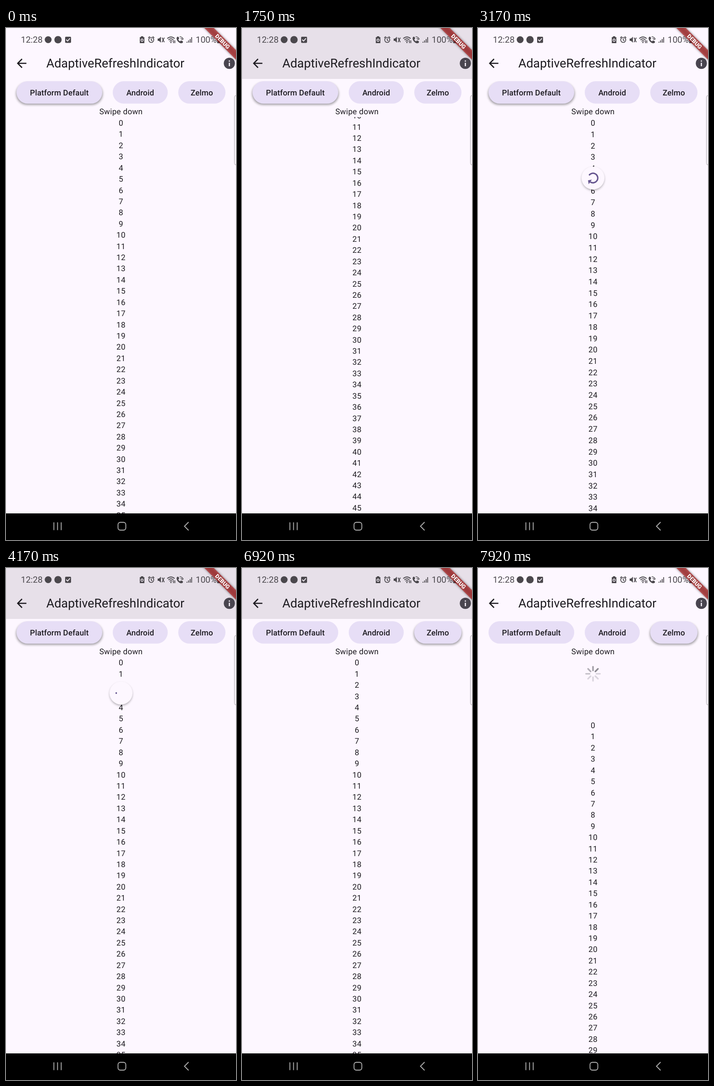
An HTML page that plays this animation: 502 by 1116 pixels, repeating every 8 s.

```html
<!DOCTYPE html>
<html lang="en">
<head>
<meta charset="utf-8">
<title>Refresh indicator demo</title>
<style>
  html, body { margin: 0; width: 100%; height: 100%; overflow: hidden; background: #fdf7ff; }
  svg { display: block; width: 502px; height: 1116px; }
  text { font-family: Roboto, "Noto Sans", sans-serif; font-size: 17.1px; fill: #1d1b20; text-rendering: geometricPrecision; }
  .mid { text-anchor: middle; }
  .body { letter-spacing: .3px; }
  .label { font-weight: 500; letter-spacing: .12px; }
  .status { font-size: 19px; fill: #4b484d; }
  .line { fill: none; stroke: #4b484d; stroke-width: 1.7; }
  .nav { fill: none; stroke: #b4b4b4; stroke-width: 1.8; }
</style>
</head>
<body>
<svg viewBox="0 0 502 1116">
  <defs>
    <clipPath id="view"><path d="M0 194H502V1058H0z"/></clipPath>
    <filter id="soft" x="-20%" y="-40%" width="140%" height="180%"><feGaussianBlur stdDeviation="2.4"/></filter>
  </defs>
  <path fill="#fdf7ff" d="M0 0H502V1116H0z"/>
  <path id="bar" fill="#e7e0e9" d="M0 0H502V111H0z"/>

  <!-- status bar -->
  <text class="status" x="32.5" y="32">12:28</text>
  <g fill="#4b484d">
    <circle cx="92" cy="25.5" r="7.5"/>
    <circle cx="113.500" cy="25.5" r="8"/>
    <rect x="129" y="19" width="13" height="13.500" rx="2"/>
    <path d="M294.500 18h5v2h2.500v13h-10v-13h2.500z"/>
    <path d="M331 23h3l4-4v13l-4-4h-3z"/>
    <path d="M373 20q2-2 4 0l1 3-2 2q1 3 4 4l2-2 4 2q1 3-2 4-5 1-9-4-4-5-2-9z"/>
    <path d="M394 30h1.800v2h-1.800zM397.500 27h1.800v5h-1.800zM401 24h1.800v8h-1.800zM404.300 20h1.800v12h-1.800z"/>
    <path d="M461 19h2v-2h5v2h2v14h-9z"/>
  </g>
  <path d="M131.500 25.500l3 3 5-6" fill="none" stroke="#fdf7ff" stroke-width="1.800"/>
  <circle cx="297" cy="26.500" r="2.500" fill="none" stroke="#fdf7ff" stroke-width="1.300"/>
  <g class="line">
    <circle cx="317" cy="26" r="5.500"/>
    <path d="M317 22.500v4l2.500 1.500M310.500 21.500l3.500-3M323.500 21.500l-3.500-3M340.500 21l5 10M345.500 21l-5 10"/>
    <path d="M352 23q8-7 16 0M354.500 26q5.500-5 11 0M357 29q3-3 6 0M365.500 27v6M368.500 33v-6M379 19q6 0 8 6M381 23q3 0 4 3"/>
  </g>
  <circle cx="360" cy="31.500" r="1.400" fill="#4b484d"/>
  <text class="status" x="414" y="32">100%</text>

  <!-- app bar -->
  <path d="M44.500 77H26M35 67.500L25.500 77l9.500 9.500" fill="none" stroke="#1d1b20" stroke-width="2.500"/>
  <text x="88" y="85.500" style="font-size:26.800px">AdaptiveRefreshIndicator</text>
  <circle cx="487.500" cy="77" r="12.200" fill="#49454f"/>
  <path d="M486.300 70.800h2.500v2.500h-2.500zM486.300 75.800h2.500v7.400h-2.500z" fill="#fdf7ff"/>

  <g id="buttons"></g>
  <text class="mid body" x="251" y="188">Swipe down</text>

  <g clip-path="url(#view)">
    <g id="list" class="mid body"></g>
    <g id="ticks" fill="#3c3c44"></g>
    <g id="disc">
      <circle cy="2.500" r="24.500" opacity=".32" filter="url(#soft)"/>
      <circle r="25" fill="#fdf7ff"/>
      <path id="arc" fill="none" stroke="#65558f" stroke-width="3.050"/>
      <path id="head" fill="#65558f"/>
    </g>
  </g>

  <rect x="498.500" y="147" width="12" height="151.500" rx="4" fill="#fbf6fc" stroke="#aaa6ac"/>

  <!-- corner ribbon -->
  <g transform="translate(502 0) rotate(45)">
    <path d="M-60 34.200H60V48.800H-60z" opacity=".5" filter="url(#soft)"/>
    <path d="M-60 34.200H60V48.800H-60z" fill="#b71c1c" opacity=".63"/>
    <text class="mid" y="46" style="font-size:12.400px;font-weight:900;fill:#fff">DEBUG</text>
  </g>

  <!-- navigation bar -->
  <path d="M0 1058H502V1116H0z"/>
  <g class="nav">
    <path d="M104.500 1077.500v17M112.500 1077.500v17M120.500 1077.500v17M398.500 1077l-9 9 9 9"/>
    <rect x="244.500" y="1077.500" width="17" height="17" rx="5"/>
  </g>
</svg>
<script>
const $ = id => document.getElementById(id);
const FPS = 12, LOOP = 8000, TOP = 194, DP = 1.22, ROW = 24.42;

// Linear tracks of [tick, value], with 12 ticks to a second.
const scroll = [[7, 0], [8, 35], [9, 95], [11, 193], [13, 255], [16, 290], [20, 290], [21, 260], [24, 40], [25, 0],
  [40, 0], [41, .6], [83, .6], [84, 0]];
const stretch = [[24, 0], [25, .004], [26, .0018], [28, 0], [31, 0], [36, .0115], [39, .0115], [41, 0]];
const drag = [[31, 0], [33, .5], [36, 1.5], [39, 1.5], [41, 1]];
const discSize = [[66, 1], [69, 0]];
const pull = [[83, 0], [85, 22], [88, 82], [91, 119], [95, 136]];
const lift = [[74, 0], [77, 1]];

function at(track, n) {
  const i = track.findIndex(k => k[0] > n);
  if (i === 0) return track[0][1];
  if (i < 0) return track[track.length - 1][1];
  const [a, x] = track[i - 1], [b, y] = track[i];
  return x + (y - x) * (n - a) / (b - a);
}

const clamp = x => Math.max(0, Math.min(1, x));
const mod = (a, b) => ((a % b) + b) % b;

// cubic-bezier(.4, 0, .2, 1)
function ease(x) {
  let lo = 0, hi = 1;
  for (let i = 0; i < 16; i++) {
    const u = (lo + hi) / 2, v = 1 - u;
    if (1.2 * v * v * u + .6 * v * u * u + u ** 3 < x) lo = u; else hi = u;
  }
  return lo * lo * (3 - 2 * lo);
}

const buttons = [['Platform Default', 23, 187], ['Android', 233, 120], ['Zelmo', 376, 103]];
$('buttons').innerHTML = buttons.map(([name, x, w], i) => `
  <rect id="shade${i}" x="${x - 1}" y="119.500" width="${w + 2}" height="48" rx="24" opacity="0" filter="url(#soft)"/>
  <rect x="${x}" y="116" width="${w}" height="48.800" rx="24.400" fill="#e7def6"/>
  <text class="mid label" x="${x + w / 2}" y="146.500">${name}</text>`).join('');

$('list').innerHTML = Array.from({length: 50}, (_, i) => `<text x="251" y="${19 + ROW * i}">${i}</text>`).join('');

$('ticks').innerHTML = Array.from({length: 8}, (_, i) =>
  `<rect x="-1.700" y="-17" width="3.400" height="11.400" rx="1.700" transform="translate(251 230.600) rotate(${i * 45})"/>`).join('');

function drawArc(start, sweep, arrow) {
  const r = 10.4, rad = Math.PI / 180;
  const point = (deg, dist) => [dist * Math.cos(deg * rad), dist * Math.sin(deg * rad)];
  const end = start + sweep, [ex, ey] = point(end, r);
  $('arc').setAttribute('d', `M${point(start, r)}A${r} ${r} 0 ${sweep > 180 ? 1 : 0} 1 ${[ex, ey]}`);
  const size = 6 * arrow, [tx, ty] = point(end + 90, size);
  $('head').setAttribute('d', arrow ? `M${point(end, r - size)}L${point(end, r + size)}L${[ex + tx, ey + ty]}z` : '');
}

function drawDisc(n) {
  const f = at(drag, n), size = at(discSize, n);
  const shown = f > 0 && size > 0;
  $('disc').style.display = shown ? '' : 'none';
  if (!shown) return;
  $('disc').setAttribute('transform', `translate(251 ${TOP + DP * (89 * f - 24.5)}) scale(${size})`);
  const spinning = n >= 42;
  $('arc').style.strokeLinecap = spinning ? 'square' : 'butt';
  $('arc').style.opacity = $('head').style.opacity = clamp(f);
  if (!spinning) return drawArc(215 - 180 * (1.5 - f), 270 * clamp(f), clamp(f));
  const ms = (n - 50) * 1000 / FPS, c = mod(ms / 1333, 1);
  const head = ease(clamp(2 * c)), tail = ease(clamp(2 * c - 1));
  drawArc(-90 + 270 * tail + 360 * (.75 + ms / 2222) + 90 * c, Math.max(270 * (head - tail), .5), 0);
}

function drawTicks(n, offset) {
  const part = offset / 122, active = Math.floor((n - 95) * 8 / FPS + 2.1);
  const fade = [47, 47, 47, 47, 72, 97, 122, 147];
  $('ticks').setAttribute('opacity', clamp(part / .35));
  [...$('ticks').children].forEach((tick, i) => {
    const alpha = part >= 1 ? fade[mod(i - active, 8)] : i < part * 8 ? 147 : 0;
    tick.setAttribute('opacity', alpha / 255);
  });
}

function draw(now) {
  const n = Math.floor((now % LOOP + 4) * FPS / 1000);
  const moved = at(scroll, n), offset = at(pull, n), raised = at(lift, n);
  $('bar').style.display = moved > 0 ? '' : 'none';
  $('list').setAttribute('transform', `translate(0 ${TOP + offset - moved}) scale(1 ${1 + at(stretch, n)})`);
  $('shade0').setAttribute('opacity', .36 * (1 - raised));
  $('shade2').setAttribute('opacity', .36 * raised);
  drawDisc(n);
  drawTicks(n, offset);
}

const began = performance.now();
function loop() {
  draw(performance.now() - began);
  requestAnimationFrame(loop);
}
loop();
</script>
</body>
</html>
```
